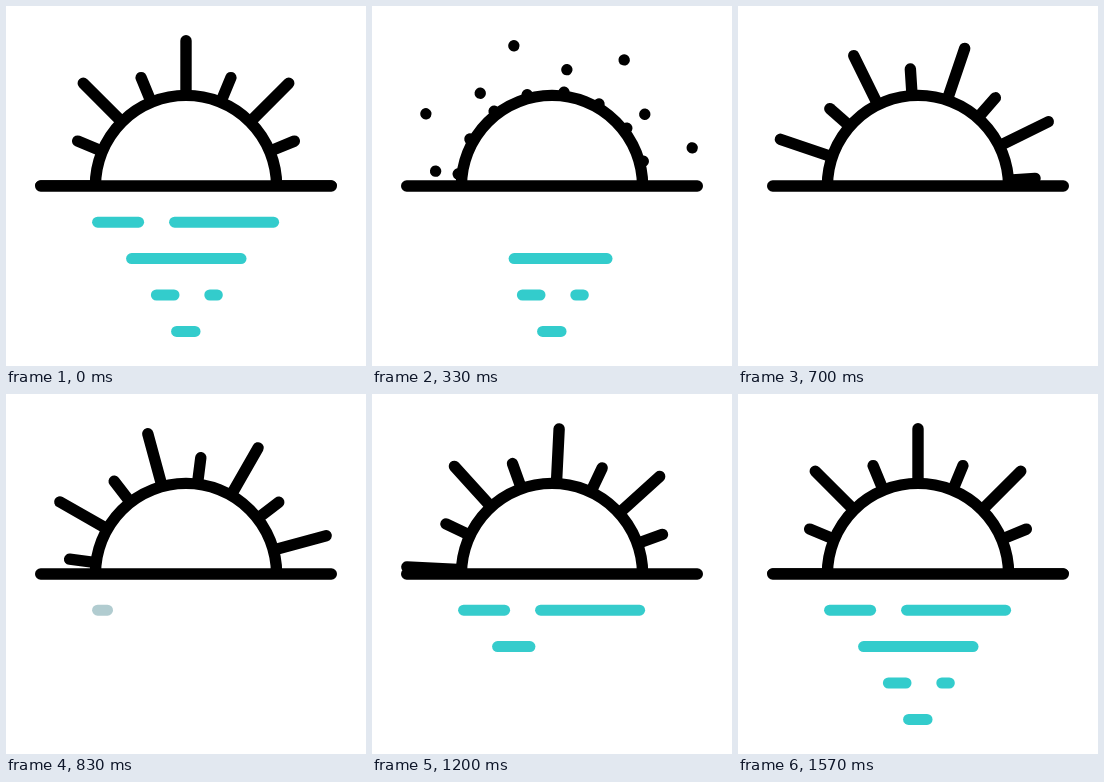
An HTML page with a canvas for the animation above (1670 ms loop, 360 by 360 pixels).

```html
<!DOCTYPE html>
<html lang="en">
<head>
<meta charset="utf-8">
<title>Sun over water</title>
<style>
  html, body { margin: 0; width: 100%; height: 100%; overflow: hidden; background: #fff; }
  canvas { display: block; width: 360px; height: 360px; }
</style>
</head>
<body>
<canvas id="stage" width="360" height="360"></canvas>
<script>
const ctx = document.getElementById('stage').getContext('2d');
const LOOP = 1670, STEP = 100 / 3, LAST = 47;
const CX = 180, CY = 180, SUN_R = 90.6, RAY_IN = 94.6, LONG_OUT = 145.3, SHORT_OUT = 117.3;

// Reflection strokes in drawing order: y, left, right
const ripples = [
  [216.2, 91.6, 132.6], [216.2, 168.6, 267.6],
  [252.6, 125.6, 235],
  [289, 150.4, 168], [289, 203.8, 211.3],
  [325.4, 170.6, 189]
];
const rippleTotal = ripples.reduce((sum, [, a, b]) => sum + b - a, 0);

const clamp = x => Math.max(0, Math.min(1, x));
const smooth = x => { x = clamp(x); return x * x * (3 - 2 * x); };
const span = (n, from, to) => clamp((n - from) / (to - from));
const mix = (a, b, k) => a + (b - a) * k;

function line(x1, y1, x2, y2) {
  ctx.beginPath();
  ctx.moveTo(x1, y1);
  ctx.lineTo(x2 + 0.01, y2);
  ctx.stroke();
}

// Swing back, return past rest, settle
function swing(n) {
  if (n < 16.5) return -32 * smooth(Math.pow(n / 16.5, 1.45));
  if (n < 34) return mix(-32, 3, smooth(span(n, 16.5, 34)));
  return mix(3, 0, smooth(span(n, 34, LAST)));
}

function drawRays(n) {
  const leave = smooth(n / 10), grow = smooth(span(n, 10, 19.4));
  ctx.save();
  ctx.beginPath();
  ctx.rect(0, 0, 360, CY);
  ctx.clip();
  ctx.translate(CX, CY);
  ctx.rotate(swing(n) * Math.PI / 180);
  for (let i = 0; i < 16; i++) {
    const outer = i % 2 ? SHORT_OUT : LONG_OUT;
    if (n <= 10) line(0, -mix(RAY_IN, outer, leave), 0, -outer);
    if (n >= 10) line(0, -RAY_IN, 0, -mix(RAY_IN, outer, grow));
    ctx.rotate(Math.PI / 8);
  }
  ctx.restore();
}

function drawRipples(n) {
  const redraw = n > 20;
  const from = redraw ? 0 : rippleTotal * smooth(span(n, 0.3, 18.85));
  const to = redraw ? rippleTotal * smooth(span(n, 22.3, 46.8)) : rippleTotal;
  const pale = redraw ? Math.exp(-Math.max(0, n - 25) / 3) : 0;
  ctx.strokeStyle = `rgb(${mix(51, 177, pale)}, 204, ${mix(204, 208, pale)})`;
  let start = 0;
  for (const [y, left, right] of ripples) {
    const a = Math.max(left, left + from - start);
    const b = Math.min(right, left + to - start);
    if (a < b) line(a, y, b, y);
    start += right - left;
  }
}

function draw(n) {
  ctx.fillStyle = '#fff';
  ctx.fillRect(0, 0, 360, 360);
  ctx.lineCap = 'round';
  ctx.lineWidth = 11.4;
  ctx.strokeStyle = '#000';
  drawRays(n);
  ctx.lineCap = 'butt';
  ctx.beginPath();
  ctx.arc(CX, CY, SUN_R, Math.PI, 2 * Math.PI);
  ctx.stroke();
  ctx.lineCap = 'round';
  line(34.7, CY, 325.3, CY);
  ctx.lineWidth = 11;
  drawRipples(n);
}

const began = performance.now();
function tick() {
  const t = (performance.now() - began) % LOOP;
  draw(Math.min(LAST, Math.floor((t + 5) / STEP)));
  requestAnimationFrame(tick);
}
tick();
</script>
</body>
</html>
```
